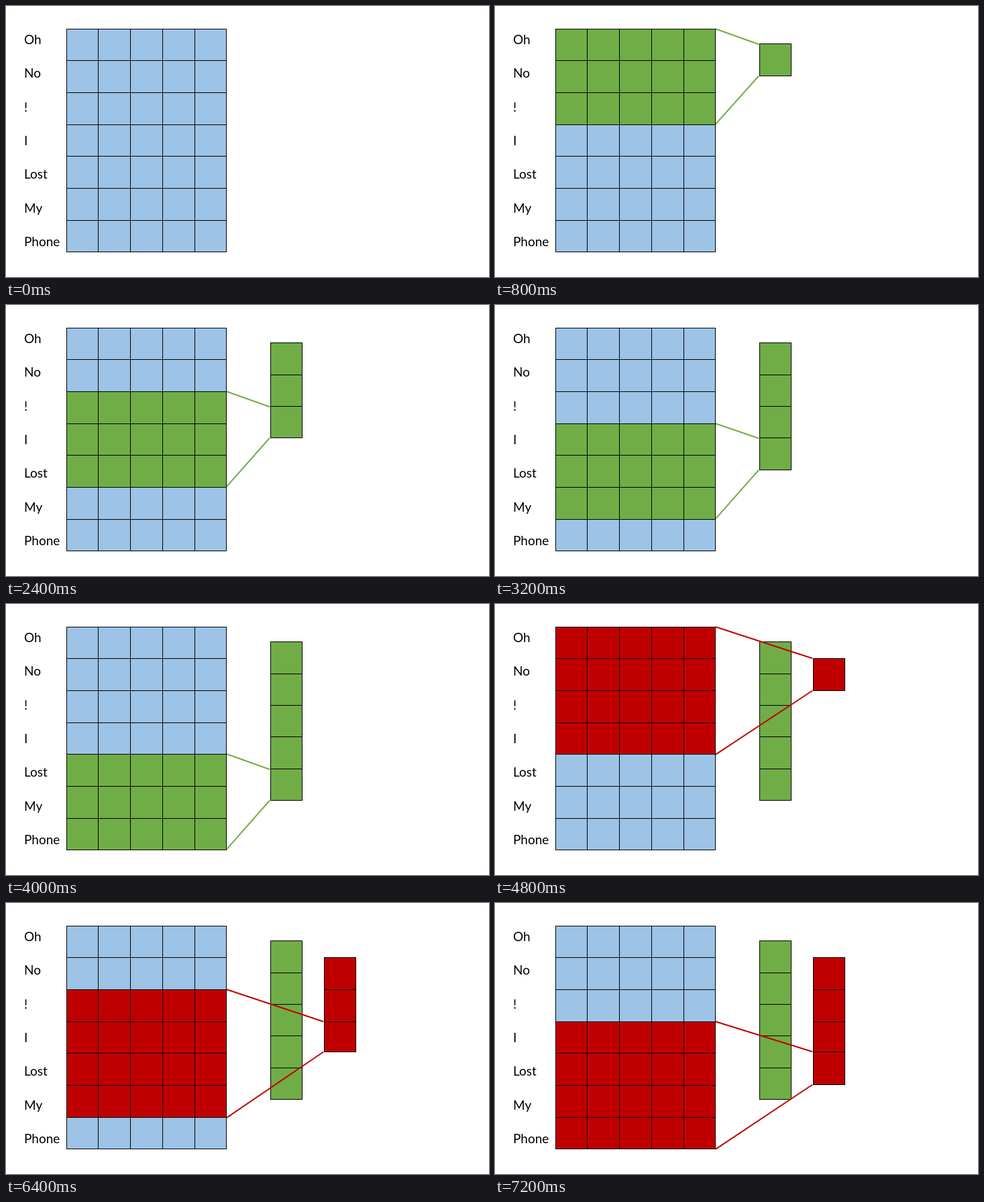
An HTML page for the animation above (8 s loop, 720 px wide and 405 px high).

```html
<!DOCTYPE html>
<html lang="en">
<head>
<meta charset="utf-8">
<title>Sliding filters</title>
<style>
  html, body { margin: 0; width: 100%; height: 100%; overflow: hidden; background: #fff; }
  svg { display: block; width: 720px; height: 405px; }
  text { font: 19px Lato, sans-serif; fill: #000; }
  .edge { stroke: #000; stroke-width: 1; fill: none; shape-rendering: crispEdges; }
  .link { stroke-width: 2; fill: none; }
  .scene { visibility: hidden; animation: slot 8s step-end infinite; }
  @keyframes slot {
    0% { visibility: visible; }
    10%, 100% { visibility: hidden; }
  }
</style>
</head>
<body>
<svg id="stage" viewBox="0 0 720 405"></svg>
<script>
  const words = ['Oh', 'No', '!', 'I', 'Lost', 'My', 'Phone'];
  const cols = [90, 137, 185, 233, 281, 328];
  const rows = [34, 81, 129, 177, 224, 272, 320, 367];
  const green = { span: 3, color: '#70ad47', x: 394, ys: [56, 104, 151, 198, 246, 293], drop: 1, foot: -0.7 };
  const red = { span: 4, color: '#c00000', x: 474, ys: [81, 129, 177, 222, 271], drop: 0, foot: 0.8 };
  const stepMs = 800, loopMs = 8000;

  const rect = (x, y, x2, y2, fill) =>
    `<rect x="${x}" y="${y}" width="${x2 - x}" height="${y2 - y}" fill="${fill}" shape-rendering="crispEdges"/>`;

  function grid(xs, ys) {
    const [l, r, t, b] = [xs[0], xs.at(-1), ys[0], ys.at(-1)];
    const v = xs.map(x => `M${x + .5} ${t}V${b + 1}`).join('');
    const h = ys.map(y => `M${l} ${y + .5}H${r + 1}`).join('');
    return `<path class="edge" d="${v}${h}"/>`;
  }

  // Output column of a filter with its first n cells filled
  function column(f, n) {
    const ys = f.ys.slice(0, n + 1), right = f.x + 47;
    return rect(f.x, ys[0], right, ys[n], f.color) + grid([f.x, right], ys);
  }

  const band = (f, i) => rect(cols[0], rows[i], cols.at(-1), rows[i + f.span], f.color);

  function links(f, i) {
    const x = cols.at(-1) + 1, end = f.x - .8;
    return `<path class="link" stroke="${f.color}" d="M${x} ${rows[i] + .3}L${end} ${f.ys[i] + f.drop + .2}` +
      `M${x} ${rows[i + f.span] + f.foot}L${end} ${f.ys[i + 1] + .5}"/>`;
  }

  const scenes = [
    '',
    ...[0, 1, 2, 3, 4].map(i => band(green, i) + column(green, i + 1) + links(green, i)),
    ...[0, 1, 2, 3].map(i => band(red, i) + column(green, 5) + column(red, i + 1) + links(red, i))
  ];

  document.getElementById('stage').innerHTML =
    words.map((w, i) => `<text x="27" y="${57 + i * 50.33}">${w}</text>`).join('') +
    rect(cols[0], rows[0], cols.at(-1), rows.at(-1), '#9dc3e6') +
    scenes.map((s, i) =>
      `<g class="scene" style="animation-delay:${i * stepMs - loopMs}ms">${s}</g>`).join('') +
    grid(cols, rows);
</script>
</body>
</html>
```
